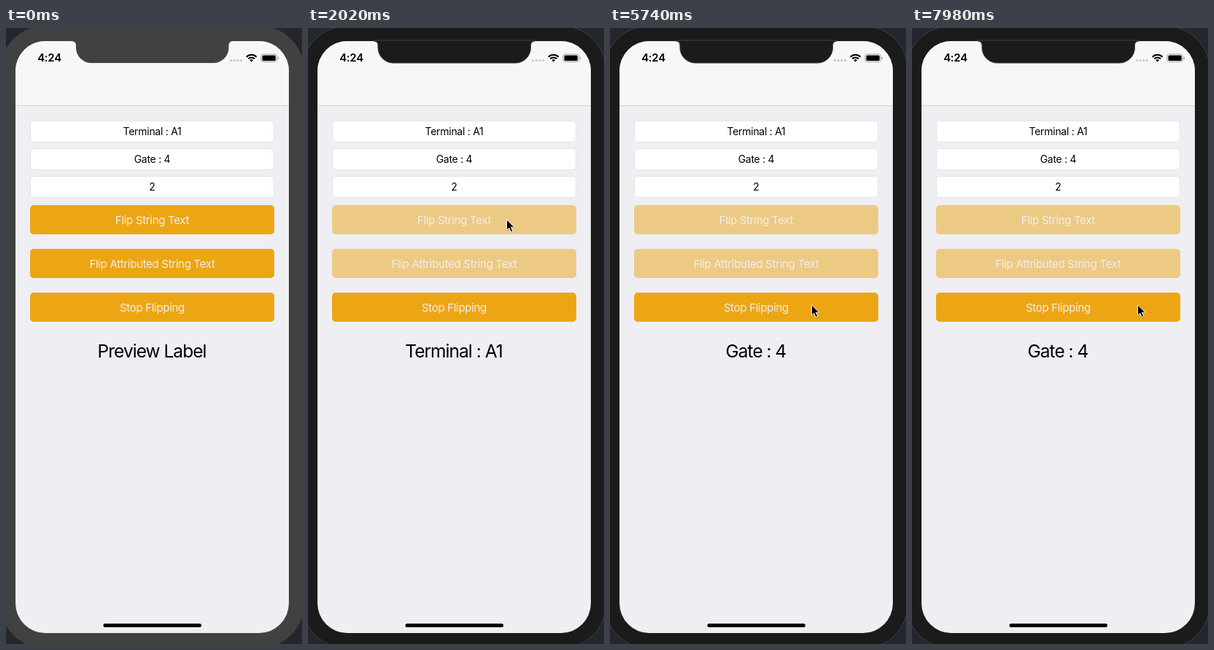
Animation, 406 px wide and 845 px high, one loop 8 s. Source, as an HTML page:

```html
<!DOCTYPE html>
<html lang="en">
<head>
<meta charset="utf-8">
<title>Flip label</title>
<style>
  html, body { margin: 0; width: 100%; height: 100%; overflow: hidden; background: #25252d; }
  svg { display: block; width: 406px; height: 845px; }
  text { font: 14px Inter, Roboto, sans-serif; letter-spacing: -.02em; text-anchor: middle; }

  .time { font-size: 15px; font-weight: 600; }
  .field rect { fill: #fff; stroke: #e4e4e8; }
  .button rect { fill: #eca614; }
  .button text { font-size: 15px; fill: #efeff4; }
  .label { font-size: 24.5px; letter-spacing: -.04em; transform-origin: 200.5px 443px; }

  .bezel, .pressed, .disabled { animation: 8s step-end infinite; }
  .bezel { fill: #414141; stroke: #373739; animation-name: focus; }
  .pressed { animation-name: press; }
  .disabled { animation-name: disable; }
  .label, .cursor { animation: 8s linear infinite; }
  .preview { animation-name: preview; }
  .terminal { animation-name: terminal; }
  .gate { animation-name: gate; }
  .cursor { animation-name: point; }

  @keyframes focus { 21.625%, 100% { fill: #1b1b1b; stroke: #404042; } }
  @keyframes press { 21.625% { opacity: .2; } 22.375%, 100% { opacity: 1; } }
  @keyframes disable { 22.375%, 100% { opacity: .5; } }

  /* Each flip turns one text edge-on, then the next one face-on. */
  @keyframes preview {
    0% { transform: none; }
    22.25% { transform: scaleY(1); animation-timing-function: ease-in; }
    23.75%, 100% { transform: scaleY(0); }
  }
  @keyframes terminal {
    0% { transform: scaleY(0); }
    23.75%, 73.25% { transform: scaleY(0); animation-timing-function: ease-out; }
    25.25%, 74.75% { transform: scaleY(1); }
    47.25%, 96.25% { transform: scaleY(1); animation-timing-function: ease-in; }
    48.75%, 97.75%, 100% { transform: scaleY(0); }
  }
  @keyframes gate {
    0% { transform: scaleY(0); }
    48.75%, 97.75% { transform: scaleY(0); animation-timing-function: ease-out; }
    50.25%, 99.25%, 100% { transform: scaleY(1); }
    71.75% { transform: scaleY(1); animation-timing-function: ease-in; }
    73.25% { transform: scaleY(0); }
  }

  @keyframes point {
    0%, 7.49% { transform: translate(430px, 470px); }
    7.5% { transform: translate(397px, 444px); animation-timing-function: cubic-bezier(.25, .3, .5, 1); }
    15.375%, 60.74% { transform: translate(272px, 262px); }
    60.75% { transform: translate(275px, 268px); animation-timing-function: ease-in-out; }
    64.375% { transform: translate(276px, 379px); }
    71.75% { transform: translate(276px, 379px); animation-timing-function: ease-in-out; }
    77.5%, 100% { transform: translate(309px, 379px); }
  }
</style>
</head>
<body>
<svg viewBox="0 0 406 845">
  <defs>
    <clipPath id="screen"><rect x="13" y="18" width="375" height="812" rx="41"/></clipPath>
  </defs>

  <rect class="bezel" x="-8" y="-3" width="417" height="854" rx="62"/>

  <g clip-path="url(#screen)">
    <rect x="13" y="18" width="375" height="812" fill="#eeeef3"/>
    <rect x="13" y="18" width="375" height="88" fill="#f7f7f8"/>
    <rect x="13" y="106" width="375" height="1" fill="#d3d3d8"/>
  </g>
  <path class="bezel" style="stroke: none"
        d="M90 17V18q6 0 6 6v3a21 21 0 0 0 21 21h167.500a21 21 0 0 0 21-21v-3q0-6 6-6V17z"/>

  <text class="time" x="59.500" y="46">4:24</text>
  <g fill="#c5c5c8">
    <circle cx="308.500" cy="44.500" r="1.600"/>
    <circle cx="313.200" cy="44.500" r="1.600"/>
    <circle cx="317.900" cy="44.500" r="1.600"/>
    <circle cx="322.500" cy="44.500" r="1.600"/>
  </g>
  <g fill="none" stroke="#000" stroke-width="2">
    <path d="M329.800 39.700a9.700 9.700 0 0 1 13.800 0M332.300 42.300a6.200 6.200 0 0 1 8.800 0"/>
    <path d="M334.300 44.100a3.400 3.400 0 0 1 4.800 0L336.700 46.500z" fill="#000" stroke="none"/>
  </g>
  <rect x="349.900" y="36" width="21.500" height="10.500" rx="2.800" fill="none" stroke="#a3a3a5"/>
  <rect x="351.500" y="37.500" width="18.300" height="7.500" rx="1.500"/>
  <path d="M372.600 39.400q1.500.5 1.500 1.900t-1.500 1.900z" fill="#a3a3a5"/>

  <g class="field">
    <rect x="33.500" y="127.500" width="334" height="29" rx="4.500"/>
    <rect x="33.500" y="165.500" width="334" height="29" rx="4.500"/>
    <rect x="33.500" y="203.500" width="334" height="29" rx="4.500"/>
    <text x="200.500" y="146.500">Terminal : A1</text>
    <text x="200.500" y="184.500">Gate : 4</text>
    <text x="200.500" y="222.500">2</text>
  </g>

  <g class="button disabled">
    <rect x="33" y="243" width="335" height="40" rx="5"/>
    <text class="pressed" x="200.500" y="268.500">Flip String Text</text>
  </g>
  <g class="button disabled">
    <rect x="33" y="303" width="335" height="40" rx="5"/>
    <text x="200.500" y="328.500">Flip Attributed String Text</text>
  </g>
  <g class="button">
    <rect x="33" y="363" width="335" height="40" rx="5"/>
    <text x="200.500" y="388.500">Stop Flipping</text>
  </g>

  <text class="label preview" x="200" y="452">Preview Label</text>
  <text class="label terminal" x="200" y="452">Terminal : A1</text>
  <text class="label gate" x="200" y="452">Gate : 4</text>

  <rect x="133.500" y="817" width="134.500" height="5" rx="2.500"/>

  <g class="cursor">
    <path d="M1 2V17L4.500 13.800L7 19l2.500-1L7.200 12.800H11.500z" fill="#000" opacity=".18"/>
    <path d="M.5.8V15.200L3.800 12.200L6.200 17.600l2.600-1.100L6.500 11.200H11z"
          fill="#000" stroke="#fff" stroke-width="1"/>
  </g>
</svg>
</body>
</html>
```
